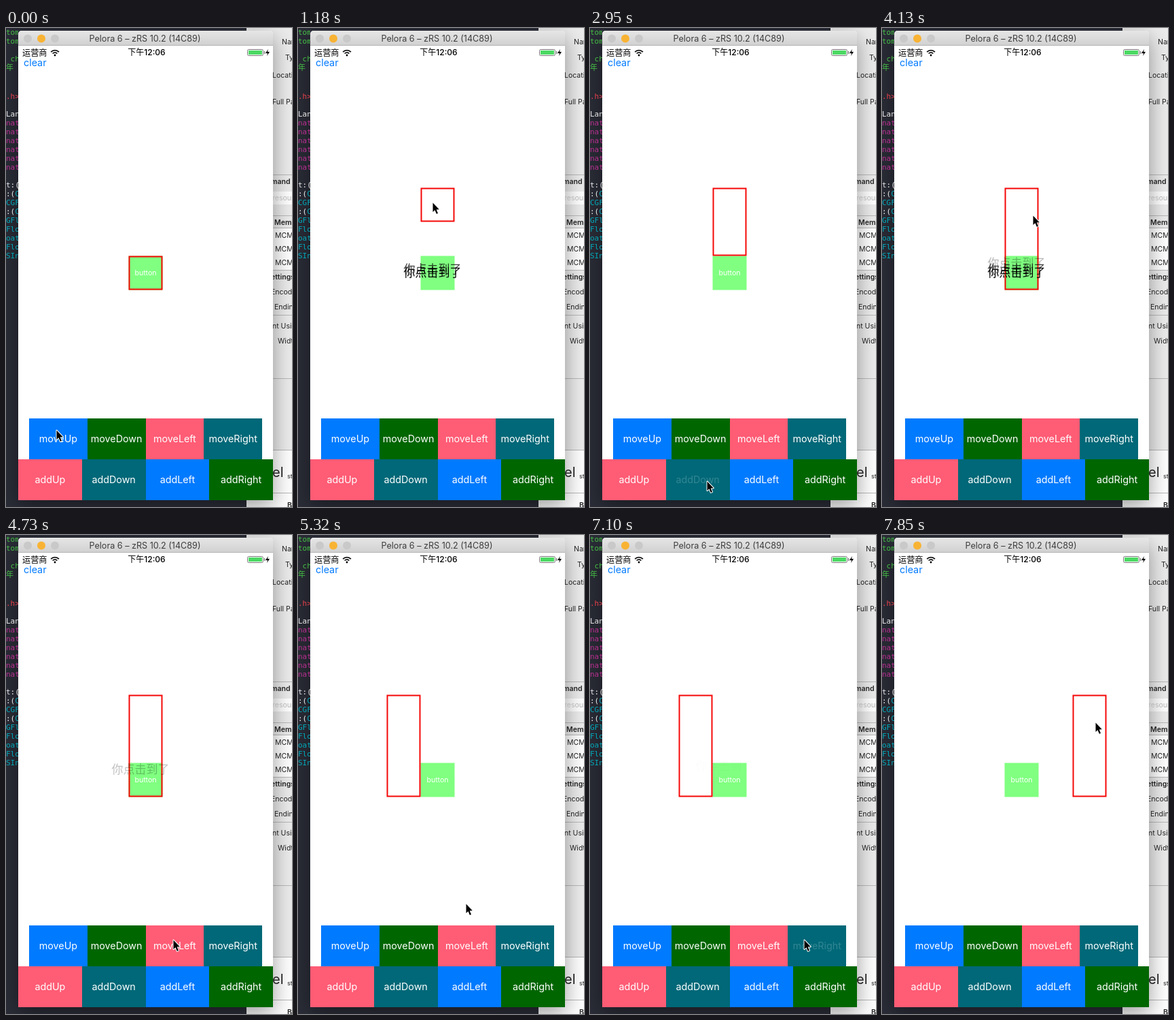
An HTML page with a canvas that plays this animation: 421 by 703 pixels, repeating every 7990 ms.

```html
<!DOCTYPE html>
<html lang="zh">
<head>
<meta charset="utf-8">
<style>
html, body { margin: 0; width: 100%; height: 100%; overflow: hidden; background: #1f2029; }
canvas { display: block; }
</style>
</head>
<body>
<canvas id="stage" width="421" height="703"></canvas>
<script>
const ctx = document.getElementById('stage').getContext('2d');
const LOOP = 7990, TICK = 147.5, LAST_TICK = 53;
const CJK = '"Noto Sans CJK SC", "Noto Sans CJK", sans-serif';
const UI = `Inter, ${CJK}`;
const MONO = '"DejaVu Sans Mono", monospace';
const BLUE = '#007aff', GREEN = '#006600', PINK = '#ff5c75', TEAL = '#006878';
const COMMENT = '#45c045', STRING = '#e8404a', PLAIN = '#eee', KEYWORD = '#bb2f92', TYPE = '#00a9b9';

// The pointer rests at a few places and eases from one to the next; times are in ticks.
const stops = [
  { from: 0, to: 3, x: 74, y: 590 },
  { from: 8, to: 10, x: 198, y: 256 },
  { from: 18, to: 20, x: 172, y: 665 },
  { from: 25, to: 28, x: 222, y: 275 },
  { from: 32, to: 34, x: 246, y: 594 },
  { from: 36, to: 36, x: 247, y: 541 },
  { from: 41, to: 44, x: 164, y: 367 },
  { from: 48, to: 51, x: 315, y: 594 },
  { from: 53, to: 54, x: 314, y: 275 }
];
const presses = { moveUp: [1, 3], addDown: [17, 20], moveLeft: [33], moveRight: [48, 49, 50] };

// Three bursts of four evenly spaced taps.
const taps = [6.7, 25.4, 40.4].flatMap(start => [0, 1, 2, 3].map(i => start + i * 1.3));
const MESSAGE_TICKS = 4;

const ease = p => p * p * (3 - 2 * p);
const mix = (a, b, p) => a + (b - a) * p;

function rect(x, y, w, h, color) {
  ctx.fillStyle = color;
  ctx.fillRect(x, y, w, h);
}

function circle(x, y, r, color) {
  ctx.fillStyle = color;
  ctx.beginPath();
  ctx.arc(x, y, r, 0, 7);
  ctx.fill();
}

function topRounded(y, h, fill) {
  ctx.fillStyle = fill;
  ctx.beginPath();
  ctx.roundRect(18, y, 375, h, [5, 5, 0, 0]);
  ctx.fill();
}

// y is the middle of the capital letters.
function text(str, x, y, size, color, { align = 'left', weight = 400, family = UI, alpha = 1 } = {}) {
  ctx.font = `${weight} ${size}px ${family}`;
  ctx.textAlign = align;
  ctx.globalAlpha = alpha;
  ctx.fillStyle = color;
  ctx.fillText(str, x, y + size * 0.36);
  ctx.globalAlpha = 1;
}

function drawCode() {
  const block = (y, lines, color, x = 0) =>
    lines.forEach((line, i) => text(line, x, y + 13 * i, 11, color, { family: `${MONO}, ${CJK}` }));
  ctx.save();
  ctx.beginPath();
  ctx.rect(0, 0, 18, 703);
  ctx.clip();
  block(6, ['tom', 'tom', '', ' ch', '年'], COMMENT);
  block(100, ['.h>'], STRING);
  block(126, ['Lan'], PLAIN);
  block(139, Array(6).fill('nat'), KEYWORD);
  block(230, ['t:(', ':(', '', ':('], PLAIN);
  block(243, ['  C', 'CGF', '  C', 'GFl', 'Flo', 'oat', 'Flo', 'SIn'], TYPE);
  ctx.restore();
}

function drawInspector() {
  rect(354, 0, 67, 703, '#ececec');
  rect(354, 240, 67, 19, '#fff');
  rect(354, 294, 67, 61, '#fff');
  rect(354, 619, 67, 84, '#fff');
  for (const y of [215, 275, 293, 355, 421, 514, 619, 682]) rect(354, y, 67, 1, '#b9b9b9');
}

function drawInspectorText() {
  const label = (str, x, y, weight = 400) => text(str, x, y, 10.5, '#222', { weight });
  ctx.save();
  ctx.beginPath();
  ctx.rect(393, 0, 28, 703);
  ctx.clip();
  label('Name', 406, 20);
  label('Type', 411, 43);
  label('Location', 392, 69);
  label('Full Path', 392, 108);
  label('mand', 390, 225, 600);
  text('resource', 392, 249, 10.5, '#b5b5b5');
  label('Membership', 395, 285, 600);
  for (let i = 0; i < 3; i++) label('MCM', 396, 304 + 20 * i);
  label('ettings', 390, 365, 600);
  label('Encoding', 390, 387);
  label('Endings', 395, 409);
  label('nt Using', 392, 437);
  label('Widths', 400, 459);
  text('el', 392, 652, 20, '#222');
  text('st', 414, 658, 9, '#222');
  label('B', 414, 700, 600);
  ctx.restore();
}

function drawWindow() {
  ctx.save();
  ctx.shadowColor = 'rgba(0,0,0,.4)';
  ctx.shadowBlur = 32;
  ctx.shadowOffsetY = 9;
  topRounded(4, 689, '#fff');
  ctx.restore();

  const bar = ctx.createLinearGradient(0, 4, 0, 26);
  bar.addColorStop(0, '#e6e6e6');
  bar.addColorStop(1, '#d0d0d0');
  topRounded(4, 22, bar);
  rect(18, 25, 375, 1, '#b4b4b4');
  ['#c9c9c9', '#f8b334', '#c9c9c9'].forEach((color, i) => circle(32 + 20 * i, 15.5, 6, color));
  text('Pelora 6 – zRS 10.2 (14C89)', 204.5, 15.5, 12.6, '#3d3d3d', { align: 'center' });
}

function drawStatusBar() {
  text('运营商', 24, 36.5, 12.2, '#000', { family: CJK });
  circle(72, 40, 1.4, '#000');
  ctx.strokeStyle = '#000';
  ctx.lineWidth = 1.6;
  for (const r of [4.4, 7.8]) {
    ctx.beginPath();
    ctx.arc(72, 40.5, r, -Math.PI * 0.77, -Math.PI * 0.23);
    ctx.stroke();
  }
  text('下午12:06', 207, 36, 12, '#000', { align: 'center', weight: 500 });

  ctx.lineWidth = 1;
  ctx.strokeStyle = '#777';
  ctx.beginPath();
  ctx.roundRect(355.5, 31.5, 23, 9, 2);
  ctx.stroke();
  rect(357, 33, 20, 6, '#4cd964');
  rect(380, 34, 1.3, 4, '#777');
  ctx.fillStyle = '#000';
  ctx.fill(new Path2D('M386 31l-4 6h3l-1 4 4-6h-3z'));
  text('clear', 26, 50.5, 14.3, BLUE);
}

function drawButtonRow(tick, names, colors, x, y, width) {
  names.forEach((name, i) => {
    const left = Math.round(x + i * width), right = Math.round(x + (i + 1) * width);
    rect(left, y, right - left, 60, colors[i]);
    const alpha = presses[name]?.includes(tick) ? 0.2 : 1;
    text(name, x + (i + 0.5) * width, y + 30, 14.3, '#fff', { align: 'center', alpha });
  });
}

function drawButtons(tick) {
  drawButtonRow(tick, ['moveUp', 'moveDown', 'moveLeft', 'moveRight'], [BLUE, GREEN, PINK, TEAL], 34, 573, 85.75);
  drawButtonRow(tick, ['addUp', 'addDown', 'addLeft', 'addRight'], [PINK, TEAL, BLUE, GREEN], 18, 633, 93.75);
}

function drawTarget(tick) {
  rect(180.5, 334.5, 50, 50, '#80ff80');
  const held = taps.some(t => Math.abs(tick - t) < 0.9);
  text('button', 205.5, 359.5, 10.6, '#fff', { align: 'center', alpha: held ? 0.12 : 1 });

  // Every finished press shifts or extends the hit area by one button size.
  const done = name => presses[name].filter(t => t < tick).length;
  const x = 180 + 50 * (done('moveRight') - done('moveLeft'));
  const y = 334 - 50 * done('moveUp');
  ctx.strokeStyle = '#f50808';
  ctx.lineWidth = 2;
  ctx.strokeRect(x + 1.5, y + 1.5, 48, 48 + 50 * done('addDown'));

  // Each tap leaves a message that drifts up while it fades.
  for (const t of taps) {
    const p = (tick - t) / MESSAGE_TICKS;
    if (p < 0 || p >= 1) continue;
    text('你点击到了', 198, 359 - 20 * ease(p), 17, '#000', { align: 'center', family: CJK, alpha: 1 - ease(p) });
  }
}

function drawCursor(tick) {
  const next = stops.find(stop => tick <= stop.to);
  const last = stops[stops.indexOf(next) - 1] ?? next;
  const p = tick >= next.from ? 1 : ease((tick - last.to) / (next.from - last.to));
  const arrow = new Path2D('M.5.5V14l3-2.8 2.3 5.6 2.2-.9-2.3-5.5 4.1-.2z');
  ctx.save();
  ctx.translate(mix(last.x, next.x, p), mix(last.y, next.y, p));
  ctx.strokeStyle = '#fff';
  ctx.fillStyle = '#000';
  ctx.lineWidth = 2;
  ctx.lineJoin = 'round';
  ctx.stroke(arrow);
  ctx.fill(arrow);
  ctx.restore();
}

function render(now) {
  const tick = Math.min(LAST_TICK, Math.floor((now % LOOP + 8) / TICK));
  rect(0, 0, 421, 703, '#2a2c37');
  drawInspector();
  drawWindow();
  drawCode();
  drawInspectorText();
  drawStatusBar();
  drawButtons(tick);
  drawTarget(tick);
  drawCursor(tick);
}

const start = performance.now();
(function loop() {
  render(performance.now() - start);
  requestAnimationFrame(loop);
})();
</script>
</body>
</html>
```
